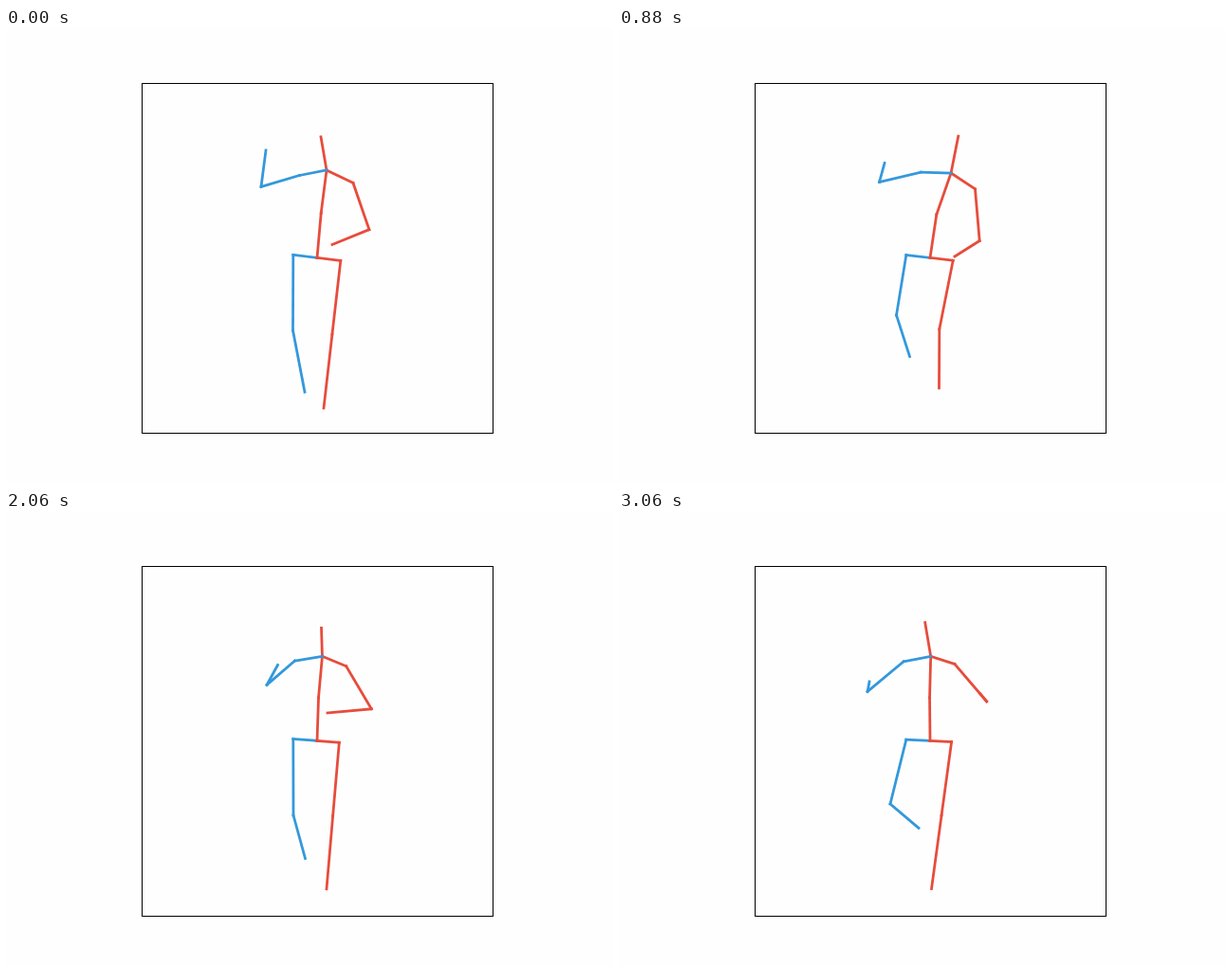
Animation of 640x480 px, one loop 3120 ms. Source, as an HTML page with a canvas:

```html
<!DOCTYPE html>
<html lang="en">
<head>
<meta charset="utf-8">
<title>Walking stick figure</title>
<style>
  html, body { margin: 0; width: 100%; height: 100%; overflow: hidden; background: #fefefe; }
  canvas { display: block; }
</style>
</head>
<body>
<canvas id="stage" width="640" height="480"></canvas>
<script>
const ctx = document.getElementById('stage').getContext('2d');
const LOOP = 3120, STEP = 62.5, LAST = 49;
const RED = '#e74c3c', BLUE = '#3498db';
const ROOT = [328, 242.4];
const KEYS = [0, 9, 14, 22, 33, 42, LAST];

const bump = (k, center, width) => Math.exp(-(((k - center) / width) ** 2));
const add = (p, x, y) => [p[0] + x, p[1] + y];
const middle = (a, b) => [(a[0] + b[0]) / 2, (a[1] + b[1]) / 2];

// Smooth path through one point per key pose
function path(...points) {
  const last = KEYS.length - 1;
  const slope = (i, axis) => {
    const a = Math.max(i - 1, 0), b = Math.min(i + 1, last);
    return (points[b][axis] - points[a][axis]) / (KEYS[b] - KEYS[a]);
  };
  return k => {
    let i = 0;
    while (i < last - 1 && k >= KEYS[i + 1]) i++;
    const h = KEYS[i + 1] - KEYS[i], u = (k - KEYS[i]) / h, w = 1 - u;
    return [0, 1].map(axis =>
      w * w * ((1 + 2 * u) * points[i][axis] + u * h * slope(i, axis)) +
      u * u * ((1 + 2 * w) * points[i + 1][axis] - w * h * slope(i + 1, axis)));
  };
}

// Only the freely swinging joints need key points
const blueKnee = path([302.5, 319], [296.5, 315], [292.5, 303], [286, 307], [303, 321], [287, 318], [286, 309]);
const blueFoot = path([315, 384], [318, 357], [306.5, 346.5], [288, 342.5], [315.5, 366.5], [308, 339.5], [316, 334.5]);
const blueElbow = path([269, 167.5], [254.5, 158.5], [274.5, 162.5], [269, 144], [275, 183.5], [272.5, 191.5], [262, 190.5]);
const blueWrist = path([274, 129], [264.5, 123.5], [280, 142.5], [297.5, 113], [286.5, 162.5], [269, 173], [264, 180]);
const redWrist = path([344, 228.5], [338, 236], [354, 241], [376, 233.5], [339, 213], [380, 180], [381, 193]);

// Each bone is its own square-capped line
function limb(color, ...points) {
  ctx.strokeStyle = color;
  for (let i = 1; i < points.length; i++) {
    ctx.beginPath();
    ctx.moveTo(...points[i - 1]);
    ctx.lineTo(...points[i]);
    ctx.stroke();
  }
}

function draw(k) {
  ctx.fillStyle = '#fefefe';
  ctx.fillRect(0, 0, 640, 480);
  ctx.lineWidth = 1;
  ctx.strokeStyle = '#000';
  ctx.strokeRect(143.5, 58.5, 370, 369);

  const lean = bump(k, 20.5, 7.3);
  const settle = bump(k, 0, 9);
  const rock = Math.sin(Math.PI * k / LAST);
  const lift = Math.abs(Math.sin(Math.PI * k / 33));
  const bend = bump(k, 14, 4);

  const redHip = [352.8 - 0.045 * k, 245.5 - 0.04 * k + 4.4 * bump(k, 22, 5)];
  const blueHip = [302.8, 2 * ROOT[1] - redHip[1]];
  const redFoot = [338 - 8.5 * lift + 8 * bend - 3 * settle, 398.5 + 2.5 * lean - 20 * bend + 2.5 * settle];
  const redKnee = add(middle(redHip, redFoot), -7 * bend, 5 * bend);

  const neck = [338 - 0.19 * k + 32.5 * lean, 153.3 - 3.3 * settle];
  const head = add(neck, 4.5 * rock + 22.5 * lean - 6, -34.5 - 4.8 * Math.sin(Math.PI * (k + 1) / 24));
  const spine = add(middle(ROOT, neck), -0.8 - 7.5 * lean, -1);

  const blueShoulder = add(neck, -28.5 - 7 * lean, 5.5 - 14 * lean);
  const redShoulder = add(neck, 25.2 + 2.8 * settle, 13.5 - 0.11 * k + 11 * lean);
  const swing = (17 + 0.48 * k - 42 * lean + 2 * settle) * Math.PI / 180;
  const upperArm = 52 + 6 * lean;
  const redElbow = add(redShoulder, upperArm * Math.sin(swing), upperArm * Math.cos(swing));

  ctx.lineWidth = 2.78;
  ctx.lineCap = 'square';
  limb(BLUE, ROOT, blueHip, blueKnee(k), blueFoot(k));
  limb(RED, ROOT, redHip, redKnee, redFoot);
  limb(RED, ROOT, spine, neck, head);
  limb(RED, neck, redShoulder, redElbow, redWrist(k));
  limb(BLUE, neck, blueShoulder, blueElbow(k), blueWrist(k));
}

const start = performance.now();
function tick() {
  const t = (performance.now() - start) % LOOP;
  // Steps fall on times rounded to 10 ms
  draw(Math.min(LAST, Math.floor((t + 4) / STEP)));
  requestAnimationFrame(tick);
}
tick();
</script>
</body>
</html>
```
